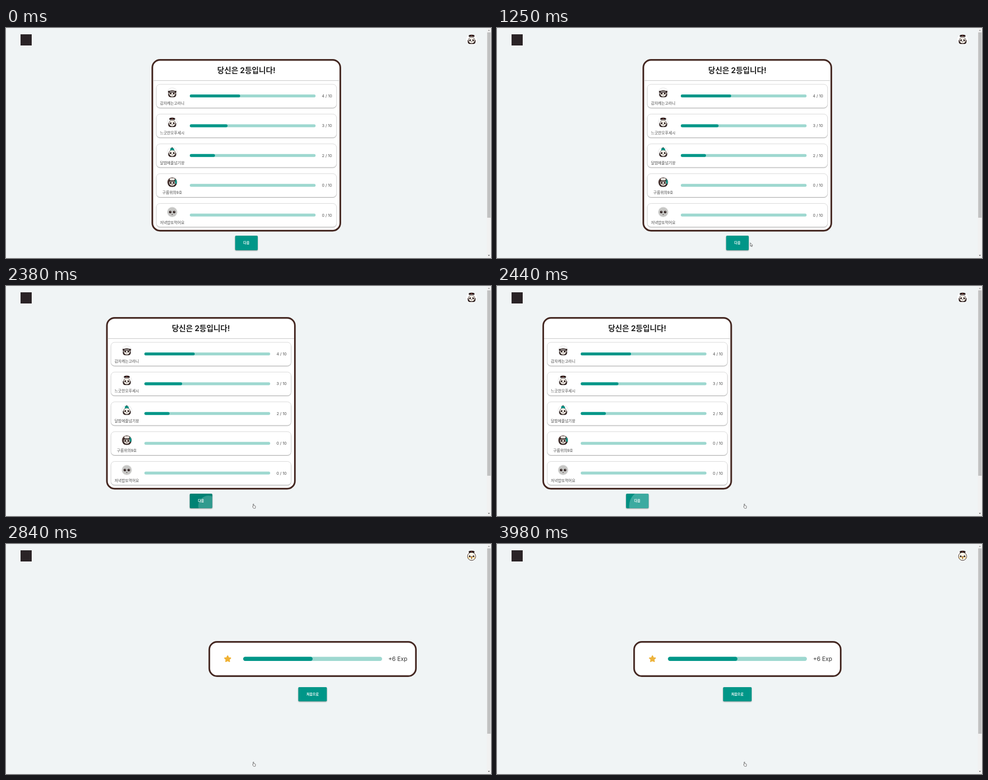
Recreate the animation shown at these times as an HTML page. Size 1000 px wide and 474 px high, loop 4.08 s.

```html
<!DOCTYPE html>
<html lang="ko">
<head>
<meta charset="utf-8">
<style>
  html, body { margin: 0; height: 100%; overflow: hidden; background: #f0f4f5; }
  svg { display: block; width: 100vw; height: 100vh; }
  text { font: 8px Inter, "Noto Sans CJK KR", sans-serif; fill: #4a4a4a; text-anchor: middle; }
  .title { font-size: 15.7px; font-weight: 700; fill: #222; }
  .name { font-size: 7.85px; }
  .exp { font-size: 11.9px; fill: #333; }
  .label { font-size: 6.9px; font-weight: 700; fill: #fff; }
  .panel { fill: #fff; stroke: #452822; stroke-width: 3.4; }
  .card { fill: #fff; stroke: #d6d6d6; filter: drop-shadow(0 1px .6px #0004); }
  .button { fill: #009688; filter: drop-shadow(0 1px 1px #0006); }
  .track { fill: #9ed8d0; }
  .fill { fill: #009688; }
</style>
</head>
<body>
<svg id="stage" viewBox="0 0 1000 474" preserveAspectRatio="none"></svg>
<script>
const WIDTH = 991, LOOP = 4080;
const DARK = '#2a1c1b', TEAL = '#0a9587';

const rect = (x, y, w, h, r, attrs) =>
  `<rect x="${x}" y="${y}" width="${w}" height="${h}" rx="${r}" ${attrs}/>`;
const text = (x, y, cls, s) => `<text x="${x}" y="${y}" class="${cls}">${s}</text>`;
const dot = (x, y, r, fill) => `<circle cx="${x}" cy="${y}" r="${r}" fill="${fill}"/>`;
const path = (d, fill, more = '') => `<path d="${d}" fill="${fill}" ${more}/>`;

const bar = (x, y, w, h, part) =>
  rect(x, y, w, h, h / 2, 'class="track"') + (part ? rect(x, y, w * part, h, h / 2, 'class="fill"') : '');

// Faces are drawn around 0,0 inside a radius of 10
const pandaFace = (face = '#f6f1e9') =>
  path('M-8 1Q-9 8-4 9H4Q9 8 8 1Z', DARK) +
  `<ellipse cy="1.5" rx="6.8" ry="6.5" fill="${face}" stroke="${DARK}" stroke-width=".8"/>` +
  `<ellipse cx="-3.2" cy="1.4" rx="1.6" ry="2.1" fill="${DARK}" transform="rotate(25 -3.2 1.4)"/>` +
  `<ellipse cx="3.2" cy="1.4" rx="1.6" ry="2.1" fill="${DARK}" transform="rotate(-25 3.2 1.4)"/>` +
  path('M-1.3 3.8H1.3L0 5.4Z', DARK);
const cap = path('M-5.5-5.5L-6-9Q0-11.5 6-9L5.5-5.5Q0-7-5.5-5.5Z', DARK) + dot(0, -8, 1, '#a5483f');

const faces = {
  band: pandaFace() + rect(-8.5, -4, 17, 4, 1, `fill="${DARK}"`) + rect(-5, -2.6, 10, 1.2, 0, 'fill="#eee"'),
  cap: pandaFace() + cap,
  leaf: pandaFace() + path('M-4-4Q-5-10 0-9.5Q5-9 4-4Q0-6-4-4Z', TEAL) + dot(0, -9.5, 1, DARK),
  chef: dot(0, 0, 9.8, '#4b3531') + pandaFace('#d8cfc8') +
    rect(-5, -8.5, 10, 5, 2, 'fill="#e4dfda"') + rect(-7, -3.5, 14, 2, 1, `fill="${DARK}"`) +
    path('M6-7L9.3-3V4L6 2Z', TEAL),
  grey: dot(0, 0, 9.8, '#c6c6c4') + dot(-4, 0, 2.5, DARK) + dot(4, 0, 2.5, DARK) +
    dot(-3.5, -.6, .7, '#fff') + dot(4.5, -.6, .7, '#fff') + path('M-1.5 4.5H1.5L0 6Z', DARK),
  bird: `<ellipse cy="1.5" rx="8.6" ry="8.3" fill="#fdf8ea" stroke="${DARK}"/>` +
    dot(-5.6, 4.2, 1.7, '#f3cf86') + dot(5.6, 4.2, 1.7, '#f3cf86') +
    dot(-4, 1.2, 1.7, DARK) + dot(4, 1.2, 1.7, DARK) +
    path('M-2 2.2Q0 .6 2 2.2L0 7.2Z', '#eda638', `stroke="${DARK}" stroke-width=".5"`) + cap
};
const avatar = (x, y, face) =>
  `<g transform="translate(${x} ${y})"><circle r="10.3" fill="#fff" stroke="#dcdcdc" stroke-width=".8"/>${faces[face]}</g>`;

const players = [
  ['감자캐는고라니', 4, 'band'],
  ['느긋한오후세시', 3, 'cap'],
  ['달밤에줄넘기왕', 2, 'leaf'],
  ['구름위의9호', 0, 'chef'],
  ['저녁밥또먹어요', 0, 'grey']
];
const playerCard = ([name, score, face], i) => {
  const y = 116 + i * 61.4;
  return rect(310, y, 371.5, 48.3, 7.5, 'class="card"') +
    avatar(342.7, y + 17.6, face) +
    text(342.7, y + 42, 'name', name) +
    bar(379, y + 21, 259.3, 6, score / 10) +
    text(661.8, y + 26.9, '', `${score} / 10`);
};

document.getElementById('stage').innerHTML = `
  <clipPath id="nextShape">${rect(472.5, 428, 46.5, 30, 2, '')}</clipPath>
  ${rect(30, 13, 23, 23, 0, 'fill="#2a2326"')}
  <g transform="translate(960 24)">
    <g id="panda">${dot(0, 0, 10.8, '#fff')}${faces.cap}</g>
    <g id="bird">${dot(0, 0, 10.8, '#fff')}${faces.bird}</g>
  </g>
  <g id="ranking">
    ${rect(301.7, 65.7, 387.6, 352, 16, 'class="panel"')}
    ${text(495.5, 92.8, 'title', '당신은 2등입니다!')}
    ${rect(303.4, 107.7, 384.2, 1.3, 0, 'fill="#cdcdcd"')}
    ${players.map(playerCard).join('')}
    ${rect(472.5, 428, 46.5, 30, 2, 'class="button" id="next"')}
    <circle id="ripple" cx="511" cy="453" fill="#fff" clip-path="url(#nextShape)"/>
    ${text(495.7, 444.8, 'label', '다음')}
  </g>
  <g id="reward">
    ${rect(282.7, 201.7, 426, 70.6, 16, 'class="panel"')}
    <path id="star" transform="translate(320.5 237)" stroke-linejoin="round"/>
    ${bar(352.5, 232.5, 286.5, 8.4, .5)}
    ${text(671.4, 241.2, 'exp', '+6 Exp')}
    ${rect(466.2, 295, 58.8, 29.3, 2, 'class="button"')}
    ${text(495.6, 312.2, 'label', '처음으로')}
  </g>
  ${rect(WIDTH, 0, 9, 474, 0, 'fill="#f1f1f1"')}
  ${rect(992.2, 9, 7, 382, 0, 'fill="#c1c1c1"')}
  ${path('M993.7 5.8L995.7 3.5L997.7 5.8Z', '#8a8a8a')}
  ${path('M993.7 467.7L995.7 470L997.7 467.7Z', '#505050')}
  <g id="cursor" stroke="#333" stroke-width=".7" stroke-linejoin="round">
    ${path('M0 0V7L1.6 5.6L2.7 8L3.9 7.5L2.8 5.2H4.9Z', '#fff', 'id="arrow"')}
    ${path('M-.6 0Q.3-.9 1 0V3L4 3.8Q4.7 4 4.6 5L4 8.5H.4L-1.6 5.4Q-1.5 4.3-.6 5Z', '#fff', 'id="hand"')}
  </g>`;

const el = Object.fromEntries([...document.querySelectorAll('[id]')].map(e => [e.id, e]));
const ramp = (t, from, to) => Math.min(1, Math.max(0, (t - from) / (to - from)));
const mix = (a, b, k) => a + (b - a) * k;
const blend = (a, b, k) => `rgb(${a.map((v, i) => Math.round(mix(v, b[i], k)))})`;
const show = (e, on) => e.setAttribute('visibility', on ? 'visible' : 'hidden');
const move = (e, x, y) => e.setAttribute('transform', `translate(${x} ${y})`);

function bezier(x1, y1, x2, y2) {
  const at = (a, b, s) => 3 * a * s * (1 - s) ** 2 + 3 * b * s * s * (1 - s) + s ** 3;
  return x => {
    let lo = 0, hi = 1;
    for (let i = 0; i < 24; i++) {
      const mid = (lo + hi) / 2;
      if (at(x1, x2, mid) < x) lo = mid; else hi = mid;
    }
    return at(y1, y2, hi);
  };
}
const ease = bezier(.25, .1, .25, 1);
const standard = bezier(.4, 0, .2, 1);

function drawStar(puff) {
  const points = Array.from({ length: 10 }, (_, i) => {
    const r = i % 2 ? mix(3.3, 2.2, puff) : mix(6.6, 5.5, puff);
    const a = (i / 5 - .5) * Math.PI;
    return `${(r * Math.cos(a)).toFixed(2)} ${(r * Math.sin(a)).toFixed(2)}`;
  });
  const color = blend([230, 182, 79], [249, 174, 25], puff);
  el.star.setAttribute('d', `M${points.join('L')}Z`);
  el.star.setAttribute('fill', color);
  el.star.setAttribute('stroke', color);
  el.star.setAttribute('stroke-width', mix(1.8, 3.8, puff));
}

function draw(t) {
  const slide = WIDTH * ease(ramp(t, 2283, 3265));
  move(el.ranking, -slide, 0);
  move(el.reward, WIDTH - slide, 0);
  show(el.panda, t < 2500);
  show(el.bird, t >= 2500);

  const enter = ease(ramp(t, 790, 1250)), settle = ease(ramp(t, 1320, 1500));
  const x = mix(mix(575, 522.3, enter), 510, settle);
  move(el.cursor, x, mix(mix(480, 442.7, enter), 449.6, settle));
  show(el.arrow, x >= 519);
  show(el.hand, x < 519);

  const hover = standard(ramp(t, 1360, 1610)) - standard(ramp(t, 2310, 2560));
  el.next.style.fill = blend([0, 150, 136], [0, 121, 107], hover);
  const press = standard(ramp(t, 2200, 2750));
  el.ripple.setAttribute('r', 47 * press);
  el.ripple.setAttribute('opacity', t > 2200 ? mix(.1, .3, press) : 0);

  drawStar(.5 + .5 * Math.cos((t - 3140) / 1200 * 2 * Math.PI));
}

function tick() {
  draw(performance.now() % LOOP);
  requestAnimationFrame(tick);
}
tick();
</script>
</body>
</html>
```
